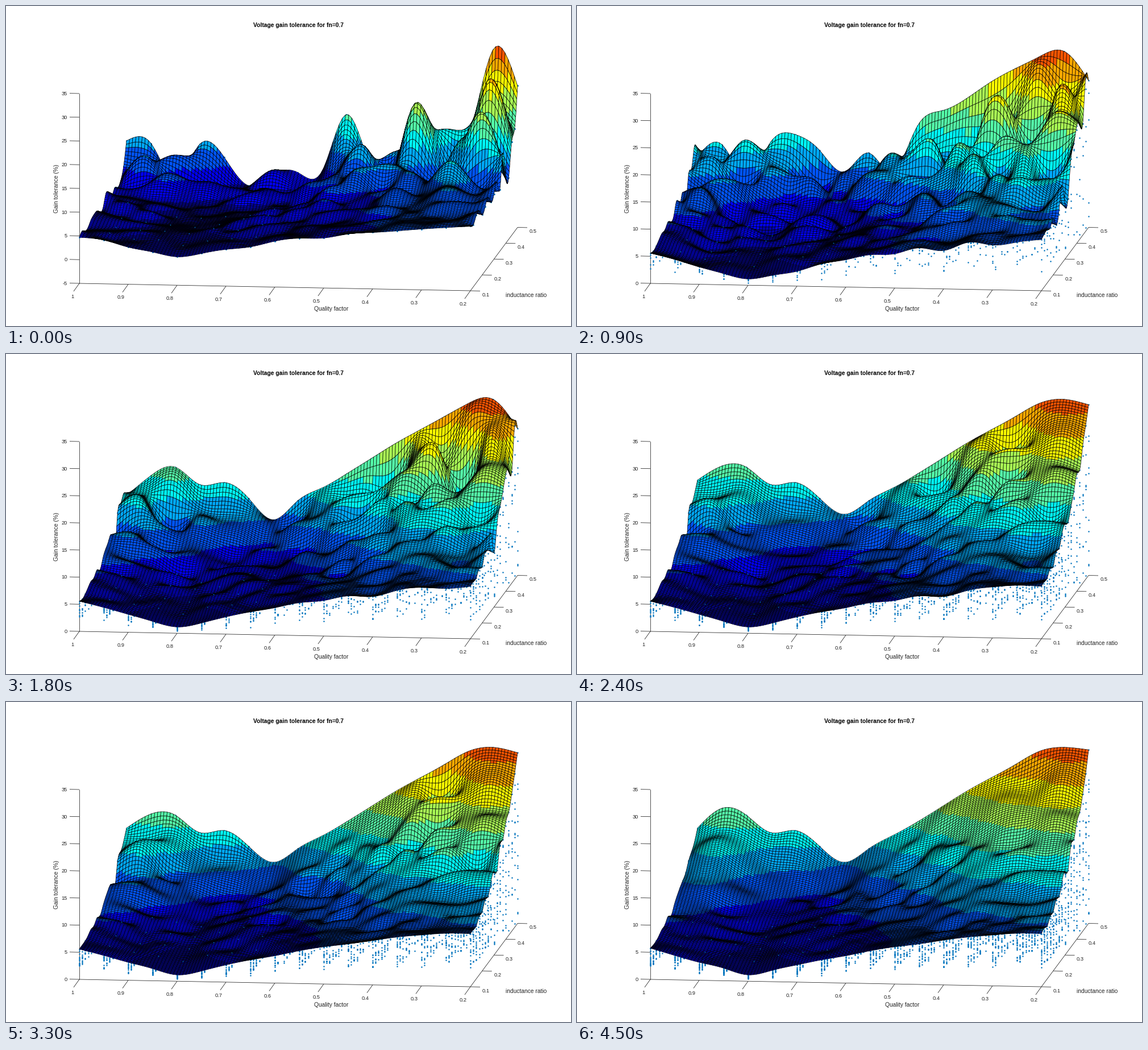
Animation, 994 px wide and 563 px high, one loop 4800 ms. Source, as a matplotlib script:

```python
import numpy as np
import matplotlib.pyplot as plt
from matplotlib.animation import FuncAnimation
from matplotlib.collections import LineCollection, PolyCollection

W, H, DPI = 994, 563, 64
FRAMES, STEP = 16, 300
NODES, GRID = 17, 126
PT = 72 / DPI
INK = "#262626"
ZMAX, TALL = 35, 334

rng = np.random.default_rng(12)
plt.rcParams["font.family"] = "Liberation Sans"


def project(u, v, z, zmin):
    """Orthographic view; u runs along quality factor, v along inductance ratio."""
    x = 129 + 688 * u + 83 * v
    y = 488 + 13 * u - 111.5 * v - TALL * (z - zmin) / (ZMAX - zmin)
    return x, y


def spline_basis(n, m):
    """Natural cubic spline weights from n knots to m points."""
    a, d = np.eye(n), np.zeros((n, n))
    for r in range(1, n - 1):
        a[r, r - 1:r + 2] = 1, 4, 1
        d[r, r - 1:r + 2] = 6, -12, 6
    curv = np.linalg.solve(a, d)
    t = np.linspace(0, n - 1, m)
    k = np.minimum(t.astype(int), n - 2)
    f = (t - k)[:, None]
    g = 1 - f
    eye = np.eye(n)
    return (g * eye[k] + f * eye[k + 1]
            + ((g**3 - g) * curv[k] + (f**3 - f) * curv[k + 1]) / 6)


def band_color(z):
    """Twelve-step jet map over 0..40."""
    b = np.clip(np.floor(z * 0.3), 0, 11)
    r = np.minimum((b - 4) / 3, (13 - b) / 3)
    g = np.minimum((b - 1) / 3, (10 - b) / 3)
    bl = np.minimum((b + 2) / 3, (7 - b) / 3)
    return np.clip(np.stack([r, g, bl], axis=-1), 0, 1)


def limit(u, v):
    """Largest tolerance each node can reach."""
    front = np.interp(u, [0, .25, .5, .75, 1], [5.8, 1.2, 5.2, 8.6, 10.4])
    back = np.interp(u, [0, .08, .2, .25, .375, .56, .69, .9, 1],
                     [16.2, 21, 15, 16.1, 10.4, 18, 24, 32.6, 32])
    valley = np.exp(-((u - .32) / .2)**2)
    return (front + (back - front) * v**(2 + 2.8 * valley)
            + 12 * valley * v * (1 - v))


# Nodes (column, row) that reach their limit at a given step
EARLY = {0: [(15, 16), (15, 14), (15, 12), (12, 14), (9, 16)],
         3: [(5, 16), (7, 16), (13, 16)],
         6: [(2, 16), (14, 16)]}


def simulate():
    """Random samples at every node and their running maximum."""
    draws = rng.random((FRAMES, NODES, NODES))
    luck = draws**2
    luck[0] *= 0.6
    for k, nodes in EARLY.items():
        for i, j in nodes:
            luck[k, j, i] = 1
    base = 0.8 - 0.6 * V
    best = base + (1 - base) * np.maximum.accumulate(luck, axis=0)
    env = limit(U, V) * best / best[-1]**(V**6)
    low = 0.4 * (1 - V)
    samples = env * (low + (1 - low) * draws)
    samples[0] = env[0]
    return env, samples


U, V = np.meshgrid(*[np.linspace(0, 1, NODES)] * 2)
GU, GV = np.meshgrid(*[np.linspace(0, 1, GRID)] * 2)
BASIS = spline_basis(NODES, GRID)
ENV, SAMPLES = simulate()

fig = plt.figure(figsize=(W / DPI, H / DPI), dpi=DPI, facecolor="white")
ax = fig.add_axes([0, 0, 1, 1])
ax.set_xlim(0, W)
ax.set_ylim(H, 0)
ax.axis("off")


def label(x, y, s, size=9.3, **kw):
    kw = {"ha": "center", "va": "center", "color": INK, **kw}
    return ax.text(x, y, s, fontsize=size * PT, **kw)


def strokes(segments):
    lines = LineCollection(segments, colors=INK, linewidths=0.8 * PT, zorder=1)
    return ax.add_collection(lines)


def draw_frame_axes():
    segs = [[(129, 154), (129, 488)], [(129, 488), (817, 501)],
            [(817, 501), (900, 389.5)]]
    for n in range(9):
        x, y = project(n / 8, 0, 0, 0)
        segs.append([(x, y), (x - 10, y + 14)])
        label(x - 12.5, y + 23.3, f"{1 - n / 10:g}")
    for n in range(5):
        x, y = project(1, n / 4, 0, 0)
        segs.append([(x, y), (x + 17, y + 0.4)])
        label(x + 20.5, y + 7.3, f"0.{n + 1}", ha="left")
    strokes(segs)
    label(514.5, 34, "Voltage gain tolerance for fn=0.7", 10.2,
          color="black", weight="bold")
    label(572.5, 533.5, "Quality factor", 10.2)
    label(879, 509.5, "inductance ratio", 10.2, ha="left")
    label(88.5, 321.5, "Gain tolerance (%)", 10.2, rotation=90)


def z_scale(zmin):
    parts, segs = [], []
    for z in range(zmin, ZMAX + 1, 5):
        y = project(0, 0, z, zmin)[1]
        segs.append([(129, y), (112, y - 0.4)])
        parts.append(label(108, y + 0.3, str(z), ha="right"))
    return parts + [strokes(segs)]


draw_frame_axes()
scales = {zmin: z_scale(zmin) for zmin in (-5, 0)}


def dot_layer(size, zorder):
    return ax.plot([], [], "o", ms=size * PT, mew=0, color="#0072bd", zorder=zorder)[0]


dots = dot_layer(2.5, 2)
top_dots = dot_layer(1.8, 4)
surface = PolyCollection([], edgecolors="black", linewidths=0.68 * PT, zorder=3)
ax.add_collection(surface)


def update(k):
    zmin = -5 if k == 0 else 0
    for key, parts in scales.items():
        for p in parts:
            p.set_visible(key == zmin)

    # Cells are painted from the back row forward
    z = BASIS @ ENV[k] @ BASIS.T
    p = np.stack(project(GU, GV, z, zmin), axis=-1)
    cells = np.stack([p[:-1, :-1], p[:-1, 1:], p[1:, 1:], p[1:, :-1]], axis=2)
    surface.set_verts(cells[::-1].reshape(-1, 4, 2))
    surface.set_facecolor(band_color(z[:-1, :-1])[::-1].reshape(-1, 3))

    seen = np.concatenate([SAMPLES[:k + 1], ENV[k:k + 1]])
    x, y = project(U, V, seen, zmin)
    dots.set_data(np.broadcast_to(x, y.shape).ravel(), y.ravel())
    near = np.s_[2:9:2, 1:8]
    x, y = project(U[near], V[near], ENV[k][near], zmin)
    top_dots.set_data(x.ravel(), y.ravel())
    return [surface, dots, top_dots]


anim = FuncAnimation(fig, update, frames=FRAMES, interval=STEP, repeat=True,
                     repeat_delay=0, blit=False)
plt.show()
```
